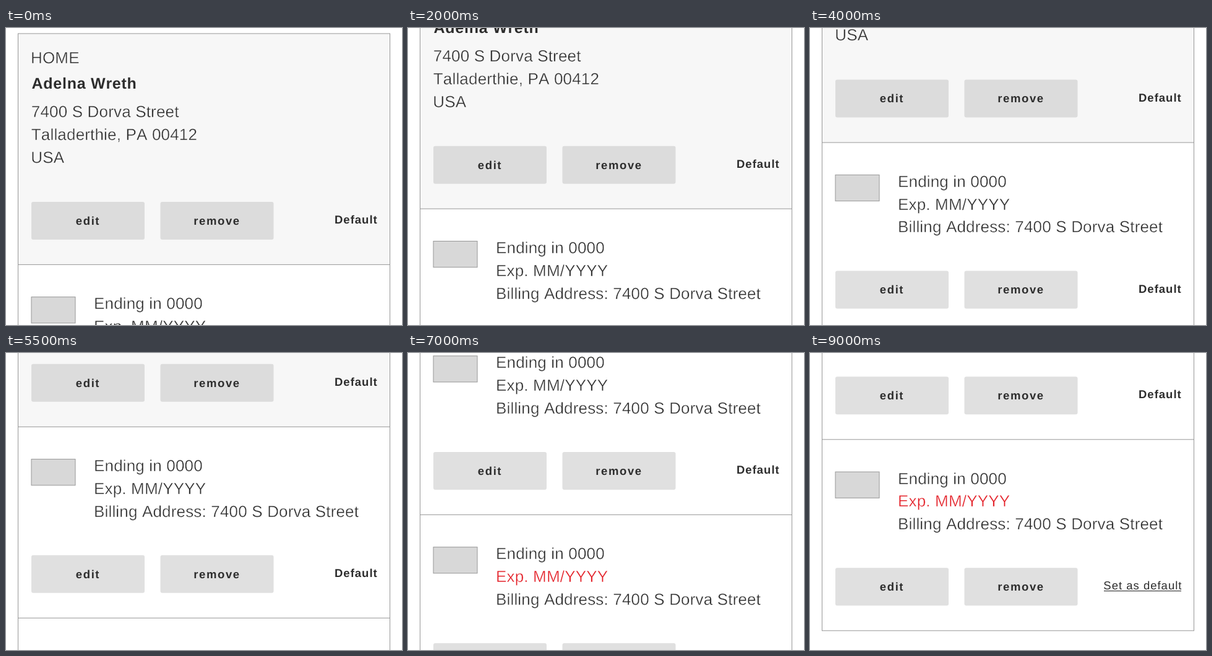
Animation, 640 px wide and 480 px high, one loop 9.5 s. Source, as an HTML page:

```html
<!DOCTYPE html>
<html lang="en">
<head>
<meta charset="utf-8">
<title>Saved cards</title>
<style>
html, body { margin: 0; width: 100%; height: 100%; overflow: hidden; background: #fff; }
svg { display: block; width: 640px; height: 480px; }
text {
  font-family: "Liberation Sans", Arial, sans-serif;
  font-kerning: none;
  text-rendering: geometricPrecision;
  fill: #2d2d2d;
}
/* a thin outline in the background colour makes the type lighter */
.light { font-size: 26px; letter-spacing: .17px; stroke: #fff; stroke-width: .45px; }
.grey .light { stroke: #f7f7f7; }
.name { font-size: 25px; font-weight: bold; letter-spacing: .75px; }
.button { font-size: 18.5px; font-weight: bold; letter-spacing: 1.6px; text-anchor: middle; }
.default { font-size: 18.5px; font-weight: bold; letter-spacing: 1px; text-anchor: end; }
.link { font-size: 18.5px; letter-spacing: 1px; }
.expired { fill: #e31b23; }
.line { fill: none; stroke: #979797; }
.chip { fill: #d8d8d8; stroke: #979797; }
</style>
</head>
<body>
<svg viewBox="0 0 640 480"><g id="page"></g></svg>
<script>
const page = document.getElementById('page');
const street = '7400 S Dorva Street';
const top0 = 9;         // top of the address card
const cardTop = 382.4;  // top of the first payment card
const step = 309;       // distance from one payment card to the next

const text = (x, y, cls, str) => `<text x="${x}" y="${y}" class="${cls}">${str}</text>`;
const rect = (x, y, w, h, attrs) =>
  `<rect x="${x}" y="${y}" width="${w}" height="${h}" ${attrs}/>`;

function buttons(fill) {
  return [[41, 'edit'], [249.5, 'remove']].map(([x, label]) =>
    rect(x, 280.9, 183, 61, `rx="3" fill="${fill}"`) +
    text(x + 91.5, 317.8, 'button', label)).join('');
}

const isDefault = text(600.7, 316, 'default', 'Default');
const setDefault = text(474.3, 316, 'link', 'Set as default') +
  rect(475, 317.6, 125, 1.1, 'fill="#2d2d2d"');

function payment(i, expired) {
  return `<g transform="translate(0 ${i * step})">` +
    rect(41, 434.7, 71, 42.2, 'class="chip"') +
    text(142, 454.3, 'light', 'Ending in 0000') +
    text(142, 491, 'light' + (expired ? ' expired' : ''), 'Exp. MM/YYYY') +
    text(142, 527.8, 'light', 'Billing Address: ' + street) +
    `<g transform="translate(0 ${step})">` +
    buttons('#e0e0e0') + (expired ? setDefault : isDefault) + '</g></g>';
}

page.innerHTML =
  rect(19.5, top0, 601, cardTop - top0, 'fill="#f7f7f7"') +
  '<g class="grey">' +
  text(40, 57.2, 'light', 'HOME') +
  text(41.5, 98, 'name', 'Adelna Wreth') +
  text(40.8, 144.2, 'light', street) +
  text(40.8, 181, 'light', 'Talladerthie, PA 00412') +
  text(40.3, 217.8, 'light', 'USA') +
  buttons('#dcdcdc') + isDefault + '</g>' +
  payment(0, false) + payment(1, true) +
  rect(19.5, top0, 601, cardTop + 2 * step - top0, 'class="line"') +
  `<path class="line" d="M20 ${cardTop}H620M20 ${cardTop + step}H620"/>`;

// The page scrolls by hand in half-second jumps; the first view stays for one second.
const scroll = [0, 18, 48, 90.2, 124, 148, 184, 197.3, 208, 222.9,
  263.1, 303, 342.6, 430, 457.2, 490.4, 526.9, 551.6];

function draw(now) {
  const i = Math.max(0, Math.floor(now % 9500 / 500) - 1);
  page.setAttribute('transform', `translate(0 ${-scroll[i]})`);
  requestAnimationFrame(draw);
}
draw(performance.now());
</script>
</body>
</html>
```
